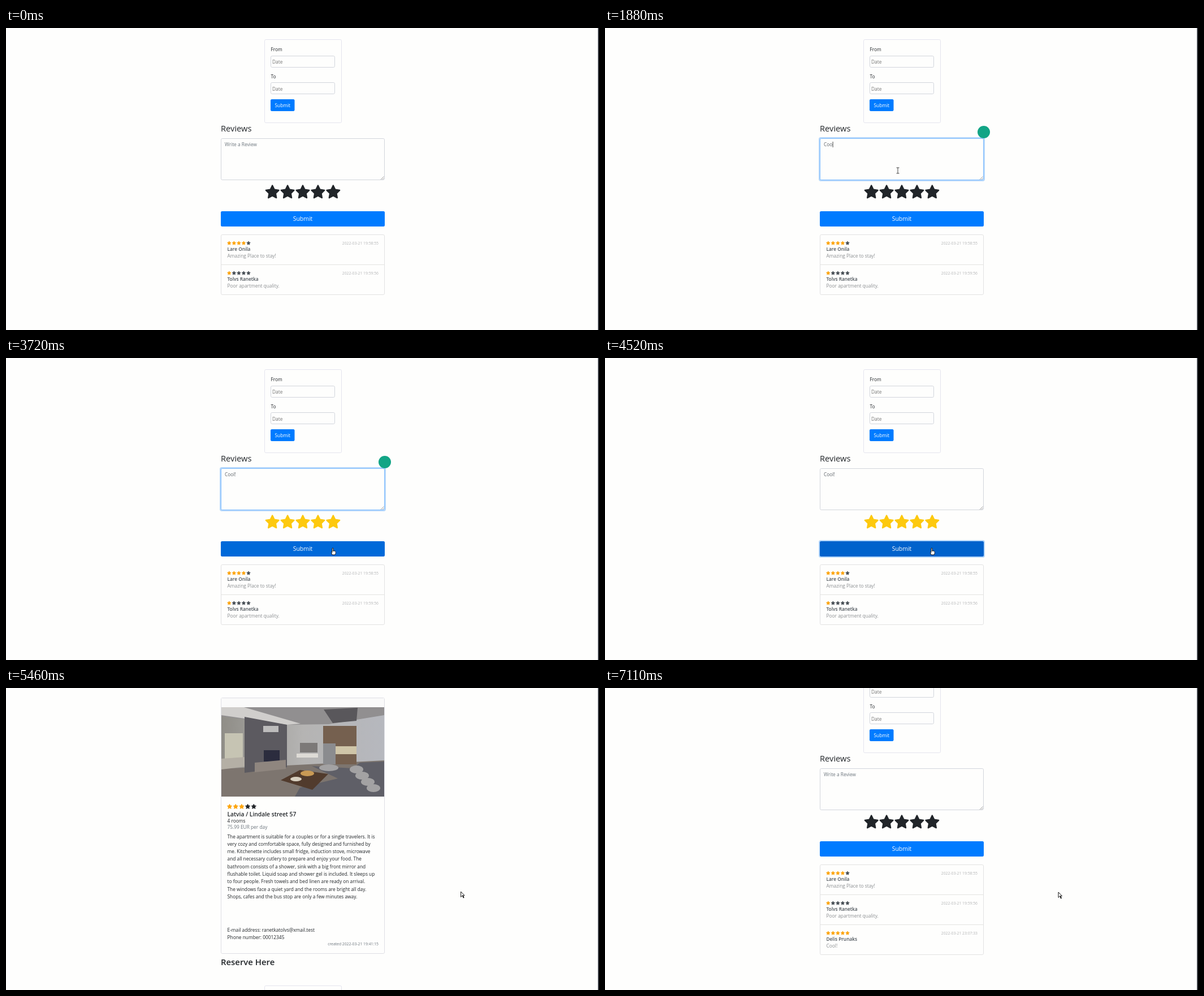
Write an HTML page with a canvas that moves like this. It is 1049x534 px and loops after 7160 ms.

```html
<!DOCTYPE html>
<html lang="en">
<head>
<meta charset="utf-8">
<title>Apartment review</title>
<style>
html, body { margin: 0; width: 100%; height: 100%; overflow: hidden; background: #fefefd; }
canvas { display: block; }
</style>
</head>
<body>
<canvas id="stage" width="1049" height="534"></canvas>
<script>
const ctx = document.getElementById('stage').getContext('2d');
const LOOP = 7160, W = 1049, H = 534;
const BLUE = '#007bff', GRAY = '#6c757d', DARK = '#212529', ORANGE = '#fda50f', YELLOW = '#fdc90f';
const PAGE = '#fefefd', LINE = '#dedee4', FIELD = '#d2d5dc';
const BODY = 8.35, SMALL = 6.8, LARGE = 10.45;
const LEFT = 380, WIDTH = 290, MID = LEFT + WIDTH / 2, INSET = 391.5, RIGHT = 659;
const REVIEWS_TOP = 704, ITEM = 53;

const FOCUS = 1280, BADGE = 1400, TYPE = 1580, KEY = 140;
const RATE = 2720, HOVER = 3300, CLICK = 3900, RELOAD = 4620;
const SCROLL = { from: 5340, to: 6000 };
const NOTE = 'Cool!';

// Each move ends at a place where the pointer then rests.
const moves = [
  { from: 450, to: 1150, x: 518, y: 252 },
  { from: 2300, to: 2700, x: 580, y: 293 },
  { from: 2850, to: 3010, x: 586, y: 305 },
  { from: 3100, to: 3450, x: 578, y: 337 },
  { from: 4560, to: 5000, x: 808, y: 359 },
  { from: 5300, to: 5600, x: 802, y: 361 }
];

const progress = (t, { from, to }) => Math.min(1, Math.max(0, (t - from) / (to - from)));
const smooth = u => u * u * (3 - 2 * u);

function setFont(size, weight = 400) {
  ctx.font = `${weight} ${size}px "Open Sans", "Noto Sans", sans-serif`;
}
function text(str, x, y, color = DARK, size = BODY, weight = 400, align = 'left') {
  setFont(size, weight);
  ctx.textAlign = align;
  ctx.fillStyle = color;
  ctx.fillText(str, x, y + size * 0.36);
}
function rect(color, x, y, w, h) {
  ctx.fillStyle = color;
  ctx.fillRect(x, y, w, h);
}
function box(x, y, w, h, fill, stroke, width = 1, radius = 2.2) {
  ctx.beginPath();
  ctx.roundRect(x, y, w, h, radius);
  if (fill) { ctx.fillStyle = fill; ctx.fill(); }
  if (stroke) { ctx.strokeStyle = stroke; ctx.lineWidth = width; ctx.stroke(); }
}
function frame(x, y, w, h, color = LINE) {
  box(x + 0.5, y + 0.5, w - 1, h - 1, PAGE, color);
}
function glow(x, y, w, h) {
  box(x - 0.5, y - 0.5, w + 1, h + 1, null, '#b5d7fb', 3);
}
function poly(color, ...p) {
  ctx.beginPath();
  for (let i = 0; i < p.length; i += 2) ctx.lineTo(p[i], p[i + 1]);
  ctx.closePath();
  ctx.fillStyle = color;
  ctx.fill();
}
function dot(color, x, y, rx, ry = rx) {
  ctx.beginPath();
  ctx.ellipse(x, y, rx, ry, 0, 0, Math.PI * 2);
  ctx.fillStyle = color;
  ctx.fill();
}
function star(x, y, r, color) {
  const points = [];
  for (let i = 0; i < 10; i++) {
    const a = i * Math.PI / 5, d = r * (i % 2 ? 0.46 : 0.92);
    points.push(x + d * Math.sin(a), y - d * Math.cos(a));
  }
  poly(color, ...points);
  ctx.strokeStyle = color;
  ctx.lineWidth = r * 0.18;
  ctx.lineJoin = 'round';
  ctx.stroke();
}
function stars(x, y, gap, r, count, on, off) {
  for (let i = 0; i < 5; i++) star(x + i * gap, y, r, i < count ? on : off);
}
function button(label, x, y, w, h, color = BLUE, size = BODY) {
  box(x, y, w, h, color);
  text(label, x + w / 2, y + h / 2, '#fff', size, 400, 'center');
}

function photo() {
  const w = 288, h = 158;
  ctx.save();
  ctx.translate(381, 232);
  ctx.beginPath();
  ctx.rect(0, 0, w, h);
  ctx.clip();
  const shade = ctx.createLinearGradient(0, 0, w, 0);
  shade.addColorStop(0, '#8f8d87');
  shade.addColorStop(0.5, '#b5b4b3');
  shade.addColorStop(1, '#b6b8be');
  rect(shade, 0, 0, w, h);
  poly('#918f90', 0, 0, w, 0, w, 14, 190, 30, 116, 31, 0, 16);
  poly('#d0cecc', 0, 0, 40, 0, 140, 29, 116, 31, 0, 14);
  poly('#59575b', 181, 4, 241, 1, 239, 24, 197, 28);
  poly('#7d756f', 0, 109, w, 94, w, h, 0, h);
  rect('#c6c4b3', 6, 46, 32, 54);
  poly('#b4afa5', 0, 91, 42, 88, 42, 105, 0, 110);
  poly('#5c5a60', 41, 17, 116, 31, 116, 106, 41, 116);
  rect('#bdbcbc', 74, 33, 27, 11);
  rect('#2b2c3e', 75, 76, 28, 20);
  poly('#8f867f', 59, 98, 114, 93, 114, 109, 59, 115);
  rect('#7c7978', 139, 63, 31, 17);
  rect('#dedbd6', 133, 82, 38, 7);
  rect('#75604f', 180, 33, 59, 68);
  rect('#8b8c8f', 180, 64, 22, 37);
  rect('#cfc5a8', 202, 69, 37, 14);
  poly('#5f5f67', 160, 104, 233, 108, 245, 98, w, 96, w, h, 130, h, 139, 142, 206, 126);
  for (let i = 0; i < 4; i++) dot('#a3a2a3', 239 + i * 10, 110 + i * 11, 12, 7);
  dot('#a3a2a3', 190, 107, 17, 6);
  poly('#513b2d', 105, 129, 139, 111, 189, 118, 161, 146);
  dot('#c99a55', 152, 117, 12, 5);
  dot('#d8d0c0', 132, 127, 10, 4);
  ctx.restore();
}

const description = [
  'The apartment is suitable for a couples or for a single travelers. It is',
  'very cozy and comfortable space, fully designed and furnished by',
  'me. Kitchenette includes small fridge, induction stove, microwave',
  'and all necessary cutlery to prepare and enjoy your food. The',
  'bathroom consists of a shower, sink with a big front mirror and',
  'flushable toilet. Liquid soap and shower gel is included. It sleeps up',
  'to four people. Fresh towels and bed linen are ready on arrival.',
  'The windows face a quiet yard and the rooms are bright all day.',
  'Shops, cafes and the bus stop are only a few minutes away.'
];

function listing() {
  rect('#343739', 0, 0, W, 5);
  text('faux orelbu', MID, 72, DARK, 21, 300, 'center');
  text('Welcome to faux orelbu. Reserve apartments today.', MID, 98, GRAY, LARGE, 300, 'center');
  button('Create Advertisement', 384, 119, 99, 21);
  button('Your Reservations', 485.5, 119, 83, 21, GRAY);
  button('Your Advertisements', 571, 119, 95, 21, GRAY);
  frame(LEFT, 215, WIDTH, 453);
  rect('#fafafa', 381, 216, 288, 16);
  photo();
  stars(395.5, 407.8, 10.7, 4.8, 3, ORANGE, DARK);
  text('Latvia / Lindale street 57', INSET, 421.5, DARK, 10.3, 600);
  text('4 rooms', INSET, 433);
  text('75.99 EUR per day', INSET, 444, GRAY);
  description.forEach((line, i) => text(line, INSET, 460.5 + i * 13.3));
  text('E-mail address: ranetkatolvs@xmail.test', INSET, 625.5);
  text('Phone number: 00012345', INSET, 638.7);
  text('created 2022-03-21 19:41:15', RIGHT, 650.7, GRAY, SMALL, 400, 'right');
  text('Reserve Here', LEFT, 683, DARK, 14.9, 600);
}

function reservation() {
  frame(457, 20, 137, 148, '#e4e4ee');
  ['From', 'To'].forEach((label, i) => {
    const y = 38 + i * 47.5;
    text(label, 468.5, y);
    frame(468, Math.round(y + 10.5), 114, 21, FIELD);
    text('Date', 471, y + 22, '#757575');
  });
  button('Submit', 468, 126, 42.5, 21);
}

function noteField(typed, focused, caretAge) {
  const y = 195, h = 74;
  if (focused) glow(LEFT, y, WIDTH, h);
  frame(LEFT, y, WIDTH, h, focused ? '#80bdff' : FIELD);
  ctx.strokeStyle = '#777';
  ctx.lineWidth = 0.7;
  for (const d of [5.5, 2.5]) {
    ctx.beginPath();
    ctx.moveTo(668.5 - d, 268);
    ctx.lineTo(668.5, 268 - d);
    ctx.stroke();
  }
  text(typed || 'Write a Review', 387, 206, typed ? '#5a6067' : GRAY);
  if (focused && caretAge % 1000 < 500) {
    rect('#333', 387.3 + ctx.measureText(typed).width, 201, 0.9, 10);
  }
}

function reviewForm(t) {
  const sent = t >= RELOAD;
  const focused = t >= FOCUS && t < CLICK;
  const keys = sent || t < TYPE ? 0 : Math.min(NOTE.length, Math.floor((t - TYPE) / KEY) + 1);
  const caretStart = keys ? TYPE + (keys - 1) * KEY : FOCUS;
  text('Reviews', LEFT, 178, DARK, 14.7);
  noteField(NOTE.slice(0, keys), focused, t - caretStart);
  if (t >= BADGE && t < CLICK) dot('#12a586', 670, 184, 11);
  stars(471.2, 290.5, 26.9, 13, t >= RATE && !sent ? 5 : 0, YELLOW, DARK);

  const pressed = t >= CLICK && !sent;
  const hovered = t >= HOVER && !sent;
  if (pressed) glow(LEFT, 324, WIDTH, 27);
  button('Submit', LEFT, 324, WIDTH, 27, pressed ? '#0062cc' : hovered ? '#0069d9' : BLUE, LARGE);
}

const reviews = [
  { name: 'Lare Onila', note: 'Amazing Place to stay!', rating: 4, date: '2022-03-21 19:58:55' },
  { name: 'Tolvs Ranetka', note: 'Poor apartment quality.', rating: 1, date: '2022-03-21 19:59:56' },
  { name: 'Delis Prunaks', note: NOTE, rating: 5, date: '2022-03-21 23:07:33' }
];
function reviewList(count) {
  frame(LEFT, 365, WIDTH, ITEM * count + 1, '#e2e2e2');
  reviews.slice(0, count).forEach(({ name, note, rating, date }, i) => {
    const y = 365 + i * ITEM;
    if (i) rect('#e4e4e1', LEFT + 1, y, WIDTH - 2, 1);
    stars(394.8, y + 15.4, 8.55, 3.8, rating, ORANGE, '#495057');
    text(date, RIGHT, y + 15.4, '#b4b5b7', SMALL, 400, 'right');
    text(name, INSET, y + 26.3, '#495057', 8.3, 600);
    text(note, INSET, y + 38, '#8b8e91');
  });
}

function beam() {
  rect('#444', -0.5, -5, 1, 10);
  for (const y of [-5.5, 4.5]) rect('#444', -2.5, y, 5, 1);
}
function hand() {
  box(-2, 4, 7, 7, '#fff', '#111', 1, 2);
  box(-1, -1, 2, 8, '#fff', '#111', 1, 1);
  rect('#fff', -0.5, 5, 5, 4);
}
function arrow() {
  poly('#111', 2, 6, 4, 6, 6, 11, 4, 11.5);
  poly('#fff', 0, 0, 0, 9.5, 2.6, 7, 6.5, 6.8);
  ctx.strokeStyle = '#111';
  ctx.lineWidth = 1;
  ctx.stroke();
}
function pointer(t) {
  if (t < moves[0].from) return;
  let x = W, y = 480;
  for (const move of moves) {
    const u = smooth(progress(t, move));
    x += (move.x - x) * u;
    y += (move.y - y) * u;
  }
  const within = (top, bottom) => t < RELOAD && x > LEFT && x < LEFT + WIDTH && y > top && y < bottom;
  ctx.save();
  ctx.translate(x, y);
  if (within(195, 269)) beam();
  else if (within(277, 302) || within(324, 351)) hand();
  else arrow();
  ctx.restore();
}

function scrollAt(t) {
  if (t < RELOAD) return REVIEWS_TOP;
  const eased = 1 - (1 - progress(t, SCROLL)) ** 1.5;
  return Math.round((REVIEWS_TOP + ITEM) * eased);
}

function render(t) {
  rect(PAGE, 0, 0, W, H);
  ctx.save();
  ctx.translate(0, -scrollAt(t));
  listing();
  ctx.translate(0, REVIEWS_TOP);
  reservation();
  reviewForm(t);
  reviewList(t < RELOAD ? 2 : 3);
  ctx.restore();
  pointer(t);
  rect('#20242c', 1047.3, 0, 1.7, H);
}

function tick() {
  render(performance.now() % LOOP);
  requestAnimationFrame(tick);
}
tick();
</script>
</body>
</html>
```
